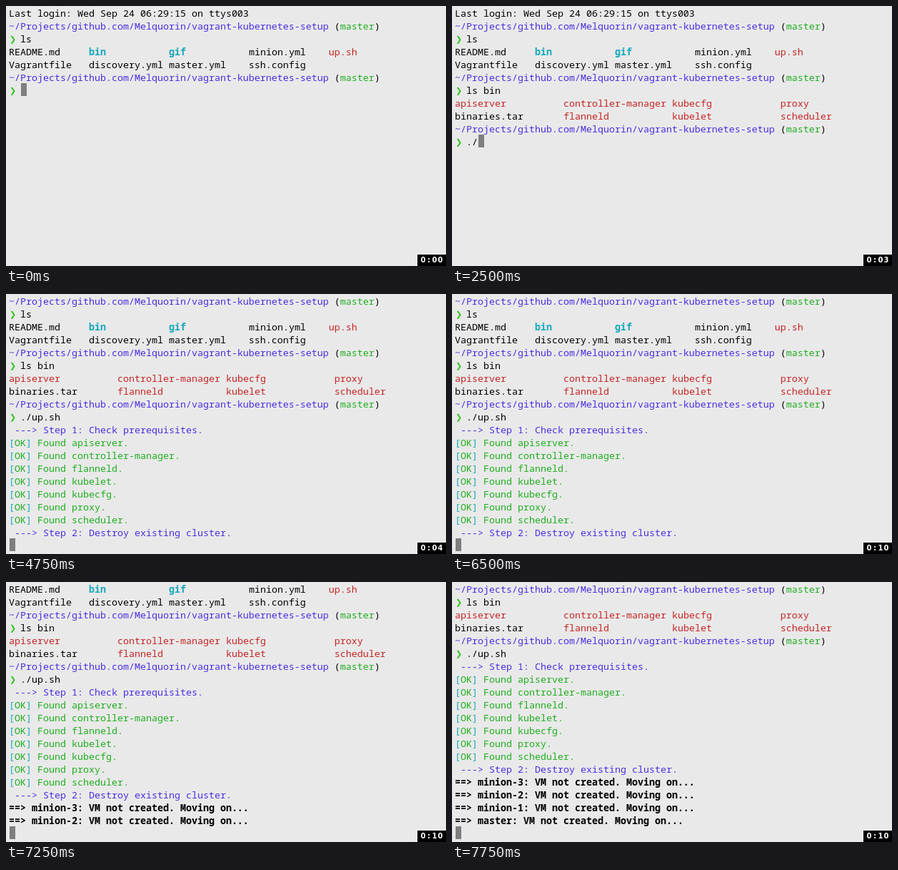
Recreate the animation shown at these times as an HTML page. Size 616x364 px, loop 8000 ms.

```html
<!DOCTYPE html>
<html>
<head>
<meta charset="utf-8">
<style>
html, body { margin: 0; width: 100%; height: 100%; overflow: hidden; background: #e9e9e9; }
#term { position: absolute; left: 4px; top: 0; color: #000;
  font: 13.3333px "Noto Sans Mono", "DejaVu Sans Mono", monospace; font-variant-ligatures: none; }
#term div { position: relative; height: 18px; line-height: 20px; white-space: pre; }
.blue { color: #4a2ee0; }
.green { color: #1eae1e; }
.cyan { color: #14a8bc; }
.red { color: #c42424; }
.prompt { display: inline-block; width: 16px; height: 18px; vertical-align: top; text-indent: 1px;
  font: 11px/21px "DejaVu Sans", sans-serif; color: #2cc41c; }
.cursor { position: absolute; top: 0; width: 8px; height: 18px; margin-left: 1px; background: #7f7f7f; }
#clock { position: absolute; left: 576px; top: 348px; width: 36px; height: 16px; padding-left: 4px;
  display: flex; background: #000; color: #fff; font: bold 10px/15px "DejaVu Sans", sans-serif; }
#clock span { width: 8px; text-align: center; }
</style>
</head>
<body>
<div id="term"></div>
<div id="clock"></div>
<script>
const LOOP = 8000, ROWS = 20;
const term = document.getElementById('term'), clock = document.getElementById('clock');

const ink = (color, text) => `<span class="${color}">${text}</span>`;
const bold = text => `<b>${text}</b>`;
const columns = (width, ...cells) =>
  cells.map(([text, wrap = t => t]) => wrap(text) + ' '.repeat(Math.max(0, width - text.length))).join('');
const red = t => ink('red', t);
const dir = t => bold(ink('cyan', t));
const step = t => ink('blue', ` ---&gt; ${t}`);
const found = t => ink('cyan', '[') + ink('green', 'OK') + ink('cyan', ']') + ink('green', ` Found ${t}.`);
const skipped = t => bold(`==&gt; ${t}: VM not created. Moving on...`);
const path = ink('blue', '~/Projects/github.com/Melquorin/vagrant-kubernetes-setup') + ` (${ink('green', 'master')})`;
const prompt = text => ink('prompt', '❯') + text;

const intro = [
  'Last login: Wed Sep 24 06:29:15 on ttys003',
  path,
  prompt('ls'),
  columns(14, ['README.md'], ['bin', dir], ['gif', dir], ['minion.yml'], ['up.sh', red]),
  columns(14, ['Vagrantfile'], ['discovery.yml'], ['master.yml'], ['ssh.config']),
  path
];
const listed = [
  ...intro,
  prompt('ls bin'),
  columns(19, ['apiserver', red], ['controller-manager', red], ['kubecfg', red], ['proxy', red]),
  columns(19, ['binaries.tar'], ['flanneld', red], ['kubelet', red], ['scheduler', red]),
  path
];
const checked = [
  ...listed,
  prompt('./up.sh'),
  step('Step 1: Check prerequisites.'),
  ...['apiserver', 'controller-manager', 'flanneld', 'kubelet', 'kubecfg', 'proxy', 'scheduler'].map(found),
  step('Step 2: Destroy existing cluster.')
];
const machines = ['minion-3', 'minion-2', 'minion-1', 'master'].map(skipped);

// Latest value whose start time has passed; entries are [ms, value].
const at = (track, t) => track.filter(([start]) => start <= t).pop()[1];

const typing = [
  [0, ''], [250, 'l'], [500, 'ls'], [750, 'ls b'], [1000, 'ls bi'], [1250, 'ls bin'],
  [1500, ''], [2250, '.'], [2500, './'],
  [3000, './u'], [3250, './up'], [3500, './up.'], [4000, './up.s'], [4250, './up.sh']
];
const seconds = [
  [0, 0], [750, 1], [1750, 2], [2250, 3], [4000, 4],
  [5250, 5], [5500, 6], [5750, 7], [6000, 8], [6250, 9], [6500, 10]
];
const created = [[0, 0], [6750, 1], [7250, 2], [7500, 3], [7750, 4]];

function screen(t) {
  if (t >= 4750) return [...checked, ...machines.slice(0, at(created, t)), ''];
  return [...(t < 1500 ? intro : listed), prompt(at(typing, t))];
}

let shown = -1;
function draw(now) {
  const t = now % LOOP, tick = Math.floor(t / 250);
  if (tick !== shown) {
    shown = tick;
    const lines = screen(t);
    lines[lines.length - 1] += '<i class="cursor"></i>';
    term.innerHTML = lines.slice(-ROWS).map(line => `<div>${line}</div>`).join('');
    const time = '0:' + String(at(seconds, t)).padStart(2, '0');
    clock.innerHTML = [...time].map(c => `<span>${c}</span>`).join('');
  }
  requestAnimationFrame(draw);
}
const start = performance.now();
const run = draw;
draw = () => run(performance.now() - start);
draw();
</script>
</body>
</html>
```
